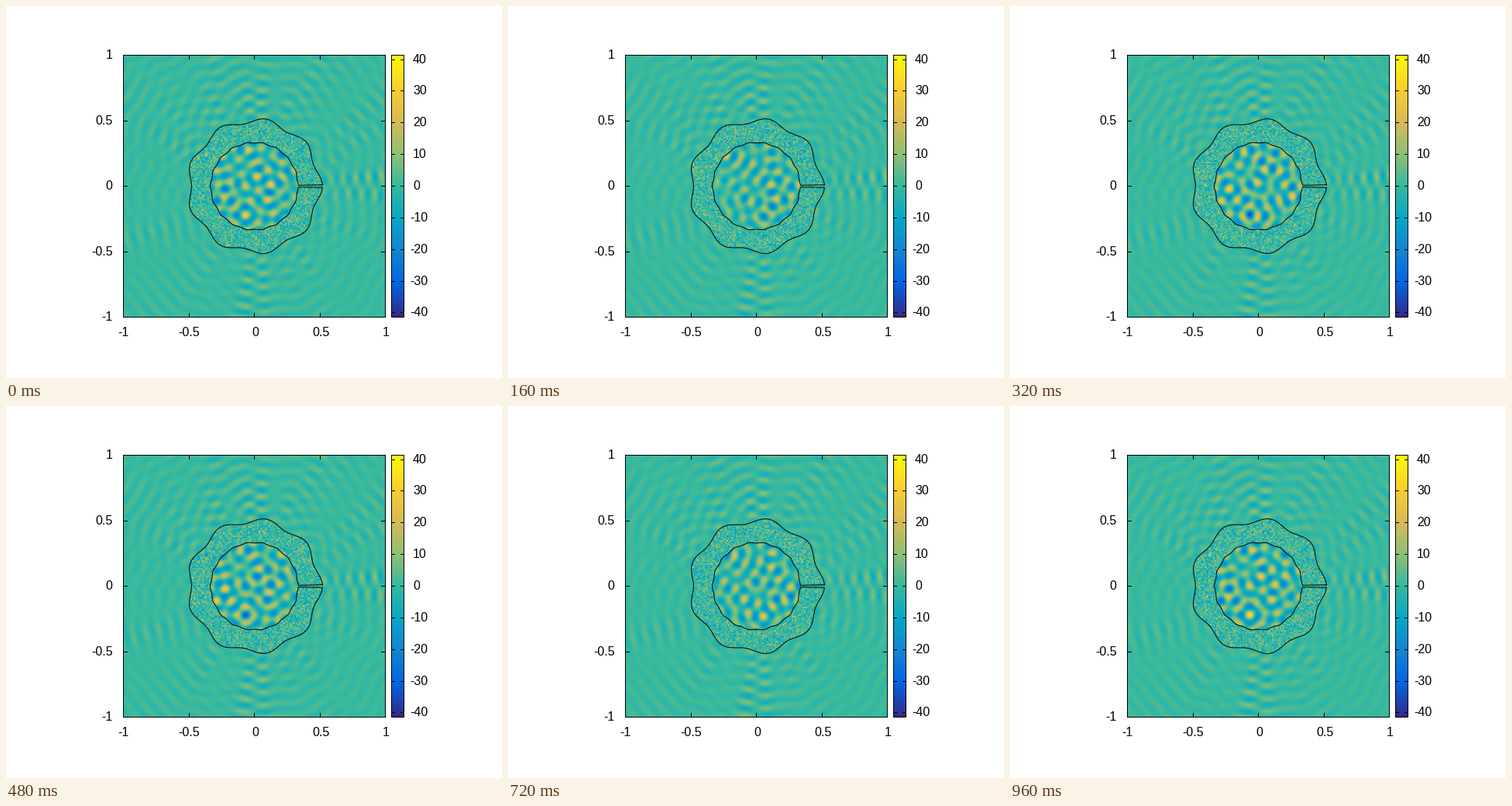
A matplotlib script that plays this animation: 640x480 px, repeating every 1 s.

```python
import numpy as np
import matplotlib.pyplot as plt
from matplotlib.animation import FuncAnimation
from matplotlib.colors import LinearSegmentedColormap

WIDTH, HEIGHT, DPI = 640, 480, 100
FRAMES, INTERVAL = 25, 40
PX = 72 / DPI
CX, CY, UNIT = 320.5, 232.5, 169
LEFT, RIGHT, TOP, BOTTOM = CX - UNIT, CX + UNIT, CY - UNIT, CY + UNIT
BAR_LEFT, BAR_RIGHT = 497.5, 513.5
VMAX = 41.35
GRID = 169
WAVENUMBER = 2 * np.pi / 16.4

PARULA = LinearSegmentedColormap.from_list("parula", [
    "#352a87", "#0363e1", "#1485d4", "#06a7c6", "#38b99e",
    "#92bf73", "#d9ba56", "#fcce2e", "#f9fb0e"], N=512)


def outer_radius(theta):
    return UNIT * (0.5 + 0.02 * np.cos(9 * theta))


def inner_radius(theta):
    return UNIT * (0.333 + 0.004 * np.cos(18 * theta))


def cavity_field(dx, dy, rng, count=60):
    """Standing waves: a strong one, and a weak one a quarter period later."""
    total = np.zeros_like(dx, dtype=complex)
    for angle in rng.uniform(0, 2 * np.pi, count):
        path = WAVENUMBER * (dx * np.cos(angle) + dy * np.sin(angle))
        strong, weak = np.cos(path + rng.uniform(0, 2 * np.pi, (2, 1)))
        total += 13 * strong + 8j * weak
    return total * np.sqrt(2 / count) * np.exp(-1j * np.pi / 6)


def radiated_field(dx, dy, rng, count=36):
    """Weak waves from sources on the shell, plus paired outgoing beams."""
    r, theta = np.hypot(dx, dy), np.arctan2(dy, dx)
    total = np.zeros_like(dx, dtype=complex)
    for angle in np.linspace(0, 2 * np.pi, count, endpoint=False):
        distance = np.hypot(dx - 70 * np.cos(angle), dy - 70 * np.sin(angle))
        strength = 0.33 * (rng.normal() + 1j * rng.normal())
        total += strength * np.exp(1j * WAVENUMBER * distance)
    outgoing = np.exp(1j * WAVENUMBER * (r - 131))
    for degrees in range(-90, 180, 30):
        strength = 6 if degrees % 90 == 0 else 2.5
        for side in (-1, 1):
            aim = np.radians(degrees + 4.5 * side)
            turn = np.angle(np.exp(1j * (theta - aim)))
            total += side * strength * np.exp(-(turn / 0.065) ** 2) * outgoing
    return total * np.sqrt(120 / np.maximum(r, 40))


rng = np.random.default_rng(12)
cells = (np.arange(GRID) + 0.5) * 2 * UNIT / GRID - UNIT
dx, dy = np.meshgrid(cells, -cells)
r, theta = np.hypot(dx, dy), np.arctan2(dy, dx)
inside = r < inner_radius(theta)
shell = ~inside & (r < outer_radius(theta))

wave = radiated_field(dx, dy, rng)
wave[shell] = 6 * (rng.normal(size=shell.sum())
                   + 1j * rng.normal(size=shell.sum()))
wave[inside] = cavity_field(dx[inside], dy[inside], rng)


def field(phase):
    return (wave * np.exp(-1j * phase)).real


fig = plt.figure(figsize=(WIDTH / DPI, HEIGHT / DPI), dpi=DPI,
                 facecolor="white")
ax = fig.add_axes([0, 0, 1, 1])
ax.axis("off")


def line(xs, ys):
    ax.plot(xs, ys, color="black", lw=PX, snap=False, zorder=3)


def label(px, py, text, align):
    ax.text(px, py, text, ha=align, va="baseline", color="black",
            family="Liberation Sans", fontsize=16 * PX)


def box(x0, x1):
    line([x0, x1, x1, x0, x0], [TOP, TOP, BOTTOM, BOTTOM, TOP])


def heat(data, x0, x1):
    return ax.imshow(data, cmap=PARULA, vmin=-VMAX, vmax=VMAX,
                     extent=(x0, x1, BOTTOM, TOP),
                     interpolation="nearest", aspect="auto")


picture = heat(field(0), LEFT, RIGHT)
heat(np.linspace(VMAX, -VMAX, 338)[:, None], BAR_LEFT, BAR_RIGHT)
box(LEFT, RIGHT)
box(BAR_LEFT, BAR_RIGHT)

for tick in (-1, -0.5, 0, 0.5, 1):
    tx, ty = np.floor([CX + UNIT * tick, CY - UNIT * tick]) + 0.5
    for edge, inward in ((BOTTOM, -5), (TOP, 5)):
        line([tx, tx], [edge, edge + inward])
    for edge, inward in ((LEFT, 5), (RIGHT, -5)):
        line([edge, edge + inward], [ty, ty])
    label(tx + (tick >= 0), 426, f"{tick:g}", "center")
    label(137.5, ty + 4.5, f"{tick:g}", "right")

for tick in range(-40, 41, 10):
    ty = np.floor(CY - UNIT * tick / VMAX) + 0.5
    line([BAR_LEFT, BAR_LEFT + 4], [ty, ty])
    line([BAR_RIGHT - 4, BAR_RIGHT], [ty, ty])
    label(521 if tick < 0 else 525, ty + 4.5, str(tick), "left")

# Shell outline with a narrow slit on the right
sweep = np.linspace(0.02, 2 * np.pi - 0.02, 500)
radius = np.concatenate([outer_radius(sweep), inner_radius(sweep[::-1])])
angle = np.concatenate([sweep, sweep[::-1]])
radius, angle = np.append(radius, radius[0]), np.append(angle, angle[0])
line(CX + radius * np.cos(angle), CY - radius * np.sin(angle))

ax.set_xlim(0, WIDTH)
ax.set_ylim(HEIGHT, 0)


def update(index):
    picture.set_data(field(2 * np.pi * index / FRAMES))
    return [picture]


animation = FuncAnimation(fig, update, frames=FRAMES, interval=INTERVAL,
                          repeat=True, repeat_delay=0, blit=False)
plt.show()
```
